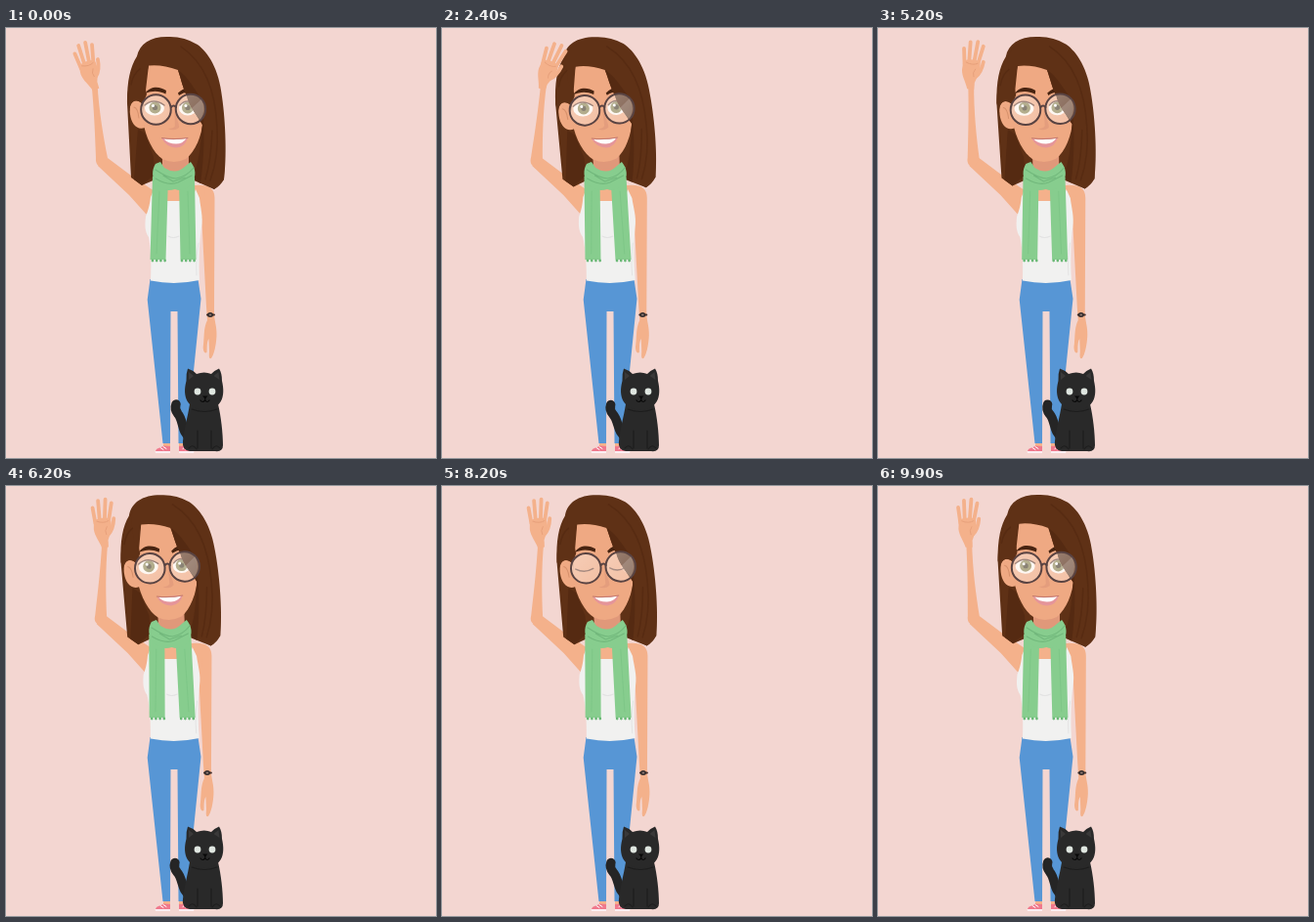
An HTML page that plays this animation: 440x440 px, repeating every 10 s.

```html
<!DOCTYPE html>
<html lang="en">
<head>
<meta charset="utf-8">
<title>Waving woman with a cat</title>
<style>
  html, body { margin: 0; width: 100%; height: 100%; overflow: hidden; background: #f3d6d1; }
  svg { display: block; width: 100%; height: 100%; }
  .skin { fill: #f4b18b; }
  .face { fill: #efa983; }
  .shade { fill: #e0987a; }
  .hair { fill: #5f3116; }
  .dark { fill: #552a12; }
  .scarf { fill: #87cd8e; }
  .line { fill: none; stroke-linecap: round; stroke-linejoin: round; }
  .fold { stroke: #72b87c; stroke-width: 1.2; }
  .finger { stroke: #f4b18b; stroke-width: 3.8; }
  .cat { fill: #292929; }
</style>
</head>
<body>
<svg viewBox="0 0 440 440">
  <defs>
    <linearGradient id="lens" x1="0" y1="0" x2="1" y2="1">
      <stop offset="0" stop-color="#fff" stop-opacity=".42"/>
      <stop offset="1" stop-color="#fff" stop-opacity=".26"/>
    </linearGradient>
    <g id="shoe">
      <path class="skin" d="M161 423h7v8h-7z"/>
      <path fill="#f0788c" d="M153 433C154 429 159 430 161 427.500L168 428V434H153z"/>
      <path fill="#fbeef2" d="M152.500 433H168V435H153z"/>
      <path class="line" stroke="#fff" d="M158 429.500l3 2M161 428.500l3 2"/>
    </g>
  </defs>

  <!-- legs -->
  <use href="#shoe"/>
  <use href="#shoe" transform="matrix(-1 0 0 1 345 0)"/>
  <path fill="#5796d5" d="M147.500 257H196.500L199.500 277L184.500 425H176.500L175.500 290H168.500L168 425H160.500L144.700 278z"/>

  <!-- lowered arm -->
  <g id="arm">
    <path class="skin" d="M194 161C206 160 213.500 163 213.500 174L213 292C213 299 216 306 215.500 315C215 325 213 334 210 338C207 339 208 334 208 331L207.500 318C205 322 206 328 205.500 332C203 334 201 329 202 324C203 316 202 307 206 299L205 285L200 190z"/>
    <path class="line" stroke="#46312d" stroke-width="2" d="M206 293.500H213"/>
    <ellipse cx="209" cy="293.500" rx="3" ry="2.500" fill="#302a2b"/>
    <ellipse cx="209" cy="293.500" rx="1.400" ry="1.100" fill="#8b7770"/>
  </g>

  <path id="upperArm" class="skin" d="M104 133L128 151L152 167V193L143 190L126 171L94 141z"/>

  <!-- trunk -->
  <g class="sway">
    <path class="skin" d="M147 168C155 160 190 158 204 163L202 195H145z"/>
    <path fill="#f1f1f0" d="M148 173L151 166L154 177H190L194 165L198 174C199 184 202 193 200 204C198 217 197 240 198 258Q173 263.500 148 258.500C149 239 148 224 146 214C142 208 142 202 143 193C145 188 147 182 148 173z"/>
    <path class="line" stroke="#e3e3e3" d="M166 213Q171 216 177 213M197 220Q194 235 195 253"/>
  </g>

  <!-- head -->
  <g id="head">
    <path class="hair" d="M168 9C149 8 137 15 134 29C127 40 124 54 124 76L128 153L139 161L153 155L190 155L213 165Q219 162 223 155C226 133 225 98 221 70C218 42 207 25 196 17Q183 9 168 9z"/>
    <path class="dark" d="M142 108L151 132L152 150L139 161L131 155L135 103z"/>
    <path class="shade" d="M160 122H187V150H160z"/>
    <path class="face" d="M140 78C132 70 125 76 127 88C128 98 134 105 142 102z"/>
    <path class="line" stroke="#d6906b" d="M131 81Q135 82 136 92"/>
    <path class="face" d="M147 33L141 63L140 94C143 113 151 128 160 134Q172 140 184 134C194 126 200 111 202 94V60L176 30z"/>
    <!-- eyes -->
    <g id="open">
      <g fill="#fdf4ec"><ellipse cx="152" cy="82" rx="10" ry="7.500"/><ellipse cx="186" cy="82" rx="9" ry="7.500"/></g>
      <g fill="#8b8250"><circle cx="152.500" cy="81.500" r="6"/><circle cx="186" cy="81.500" r="6"/></g>
      <g fill="#4c402c"><circle cx="152.500" cy="81.500" r="2.600"/><circle cx="186" cy="81.500" r="2.600"/></g>
      <g fill="#fff"><circle cx="150.500" cy="79.500" r="1.500"/><circle cx="184" cy="79.500" r="1.500"/></g>
      <path class="line" stroke="#6d4434" stroke-width="1.400" d="M142 79Q151 71 162 79M178 79Q185 71 195 79"/>
    </g>
    <path id="closed" class="line" stroke="#7b5040" stroke-width="1.400" d="M143 84Q152 89 161 84M178 84Q186 89 194 84"/>
    <path fill="#482411" d="M142.500 67C148 58.500 158 60 164 64L163.500 67.500C156 64 150 64 142.500 67zM176 66.500C182 61 188 60 194 63V67Q184 64 177 69z"/>
    <path class="shade" d="M172 81C173 91 178 98 177 102Q172 106 166 103Q172 103 173 100z" opacity=".7"/>
    <!-- mouth -->
    <path fill="#e5959a" d="M159.500 113Q173 113 186 112.500Q183 122 174 122.500Q164 122 159.500 113z"/>
    <path fill="#fff" d="M161.500 113.500Q173 115 184.500 113Q181 118.500 174 118.500Q166 118.500 161.500 113.500z"/>
    <path class="line" stroke="#c47b6c" d="M159.500 112.500Q173 114.500 186 112.500"/>
    <!-- front hair -->
    <path class="hair" d="M140 46L144 68L140 78C132 70 125 77 127 88L124 76C125 55 129 47 137 40z"/>
    <path class="hair" d="M137 42C133 25 143 12 164 10C190 9 209 28 218 63C224 92 225 130 223 155L213 165L190 150C197 138 199 119 201 99C196 90 187 80 185 69C181 62 179 51 176 43Q160 37 146 38.500L143 64L138 55z"/>
    <path class="dark" d="M176 43C187 50 193 64 200 72C204 98 203 133 199 159L190 153C198 139 199 121 201 99C196 90 187 80 185 69C181 62 179 51 176 43z"/>
    <path class="line" stroke="#572b12" stroke-width="1.500" d="M179 19C204 36 214 64 216 101Q218 131 209 156M211 105Q210 135 204 155M137 42Q130 47 128 58"/>
    <!-- glasses -->
    <g fill="url(#lens)" stroke="#594342" stroke-width="2">
      <circle cx="153.500" cy="83.500" r="15.300"/>
      <circle cx="189" cy="83" r="15.200"/>
    </g>
    <path fill="#fff" opacity=".16" d="M188 84L200 73Q205 84 199 94z"/>
    <path class="line" stroke="#594342" stroke-width="2" d="M169 81Q171.500 78 174 81"/>
  </g>

  <!-- scarf -->
  <g class="sway">
    <path class="scarf" d="M150 152H166L163.500 237H147.500zM177 153H193L194.500 237H178.500z"/>
    <path class="scarf" d="M153 139C149 145 149 154 154 160C159 166 166 167 173 165C181 168 189 163 192 156C195 148 193 142 189 137L184 141Q174 151 162 143L158 137z"/>
    <path class="line fold" d="M153 145Q166 154 174 154Q185 152 192 143M153 154Q166 162 176 158L190 151M161 151L171 157L183 153"/>
    <path class="line" stroke="#7ec687" d="M157 167L154 231M186 167L188 231"/>
    <path class="line" stroke="#6bb976" stroke-width="2.800" stroke-dasharray="0 4.200" d="M150 238H163M180 238H193.500"/>
  </g>

  <!-- waving forearm -->
  <g id="forearm">
    <path class="skin" d="M87.500 57H93.500C95 85 100 113 104 133L99 144L94 140.500Q91.500 138 92 133C91 105 90 83 87.500 57z"/>
    <g id="hand">
      <path class="skin" d="M-3.500 5C-5-1-10-7-10.500-14L-10-23Q-2-27 7-24Q9-17 6-9L3.500-2V5z"/>
      <path class="line finger" d="M-8.500-20L-10.500-36M-4-22L-4.500-43M1-22L3-44M5-21L9-40M4-8Q9.500-13 10.500-24"/>
      <path class="line" stroke="#e69f7a" stroke-width=".9" d="M-7-22Q0-19 5-22M2-8Q0-12 3-16"/>
    </g>
  </g>

  <!-- cat -->
  <path id="tail" class="line" stroke="#252525" stroke-width="9.500" d="M189 420C179 413 182 402 176 395Q172 390 174 385"/>
  <path class="cat" d="M188 385H217C220 397 222 415 222 427Q222 434 214 433H188Q180 432 181 423C182 411 186 398 188 385z"/>
  <path class="cat" d="M186 348.500Q191 350 195 354Q203 351 210 354Q214 350 218 348.500Q221 353 221 361C225 378 220 390 203 391C186 390 180 378 184.500 361Q184 354 186 348.500z"/>
  <path fill="#3a3939" d="M187 352L192 356L187 360zM217.500 352L212.500 356L218.500 360z"/>
  <path class="line" stroke="#1d1d1d" stroke-width="1.200" d="M190 390Q203 395 216 390M196 412V430M210 412V430M187 430Q191 425 195 431M211 431Q215 425 219 430"/>
  <g fill="#dfe6e0"><circle cx="196" cy="372" r="3.400"/><circle cx="211" cy="372" r="3.400"/></g>
  <path fill="#080808" d="M201 376.500H206.500L203.800 379.500z"/>
  <path class="line" stroke="#080808" stroke-width="1.200" d="M203.800 379V381Q201 384 199 381M203.800 381Q206 384 208 381"/>
</svg>
<script>
  const $ = id => document.getElementById(id);
  const LOOP = 10000, WAVES = 15, STEP = 100;
  const swaying = document.querySelectorAll('.sway');
  const place = (part, value) => part.setAttribute('transform', value);
  const cosine = (phase, lag) => Math.cos(2 * Math.PI * (phase - lag));
  const swing = (phase, lag) => (1 - cosine(phase, lag)) / 2;

  function draw(now) {
    const t = Math.floor((now % LOOP) / STEP) * STEP;
    const phase = t / LOOP * WAVES;
    const lean = swing(phase, -0.02);
    const bend = 12.5 * swing(phase, -0.015);
    const handTilt = 1 - 20 * cosine(phase, 0.085); // the hand trails the forearm
    const shift = x => `translate(${x * lean} 0)`;

    for (const part of swaying)
      place(part, `translate(0 262) skewX(${2.7 * lean}) translate(0 -262)`);
    place($('arm'), shift(-4.3));
    place($('upperArm'), shift(-2));
    place($('head'), `${shift(-5.5)} rotate(${-2.8 * lean} 172 150)`);
    place($('forearm'), `${shift(-2)} rotate(${bend} 98 137)`);
    place($('hand'), `translate(90.5 58) rotate(${handTilt - bend})`);
    place($('tail'), `rotate(${-2.5 * lean} 189 420)`);

    const blink = t >= 8100 && t < 8300;
    $('open').style.display = blink ? 'none' : '';
    $('closed').style.display = blink ? '' : 'none';
  }

  const start = performance.now();
  function tick() {
    draw(performance.now() - start);
    requestAnimationFrame(tick);
  }
  tick();
</script>
</body>
</html>
```
